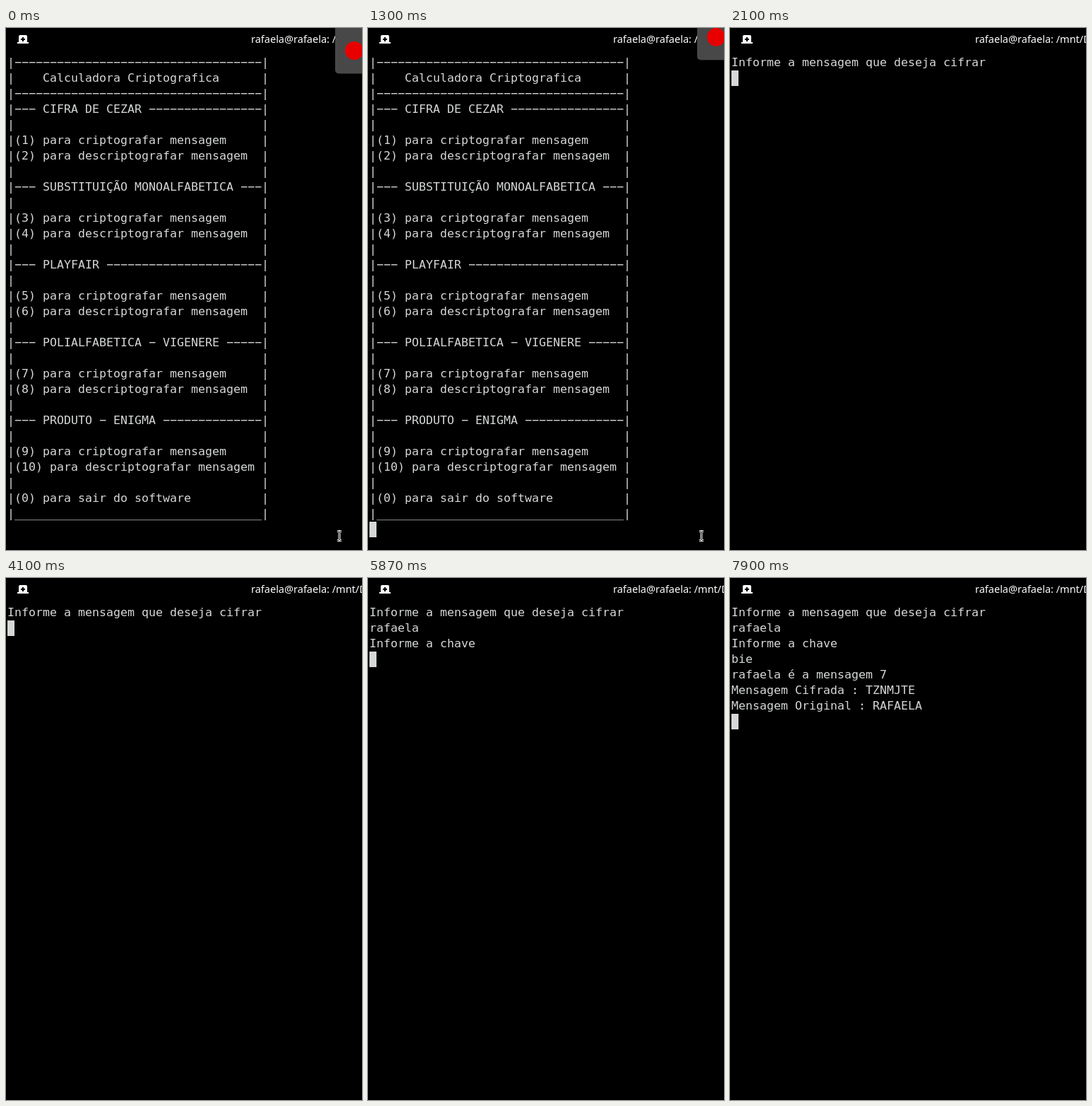
Recreate the animation shown at these times as an HTML page with a canvas. Size 504x738 px, loop 8000 ms.

```html
<!DOCTYPE html>
<html lang="pt">
<head>
<meta charset="utf-8">
<title>Calculadora Criptografica</title>
<style>
  html, body { margin: 0; width: 100%; height: 100%; overflow: hidden; background: #000; }
  canvas { display: block; }
</style>
</head>
<body>
<canvas id="stage" width="504" height="738"></canvas>
<script>
const ctx = document.getElementById('stage').getContext('2d');
const LOOP = 8000;
const CELL = { x: 2, y: 38, w: 10, h: 22, base: 16 };
const INK = '#d5d8d6';
const USER = 'rafaela';
const KEY = 'bie';

// Menu box, 35 characters between the side bars
const WIDTH = 35;
const DASH = '\u2212';
const boxed = (text, fill = ' ') => '|' + text.padEnd(WIDTH, fill) + '|';
const section = (title, first) => [
  boxed(`${DASH.repeat(3)} ${title} `, DASH),
  boxed(''),
  boxed(`(${first}) para criptografar mensagem`),
  boxed(`(${first + 1}) para descriptografar mensagem`),
  boxed('')
];
const MENU = [
  boxed('', DASH),
  boxed('    Calculadora Criptografica'),
  boxed('', DASH),
  ...section('CIFRA DE CEZAR', 1),
  ...section('SUBSTITUIÇÃO MONOALFABETICA', 3),
  ...section('PLAYFAIR', 5),
  ...section(`POLIALFABETICA ${DASH} VIGENERE`, 7),
  ...section(`PRODUTO ${DASH} ENIGMA`, 9),
  boxed('(0) para sair do software'),
  boxed('', '_')
];

// Moments (ms) at which the block cursor flips, starting hidden
const BLINKS = [100, 530, 1200, 2570, 3030, 3630, 4100, 4670, 4750, 6030, 6430, 7100, 7500];

const typed = (text, t, start, gap) =>
  t < start ? '' : text.slice(0, Math.floor((t - start) / gap) + 1);

// The last line returned is the one holding the cursor
function screenAt(t) {
  if (t < 2000) return [...MENU, typed('7', t, 1800, 80)];
  const lines = ['Informe a mensagem que deseja cifrar', typed(USER, t, 4750, 80)];
  if (t >= 5400) lines.push('Informe a chave', typed(KEY, t, 6570, 80));
  if (t >= 7500) lines.push(
    `${USER} é a mensagem ${USER.length}`,
    'Mensagem Cifrada : TZNMJTE',
    `Mensagem Original : ${USER.toUpperCase()}`,
    ''
  );
  return lines;
}

function drawTerminal(t) {
  const lines = screenAt(t);
  ctx.font = '16.6px "DejaVu Sans Mono", "Noto Sans Mono", monospace';
  ctx.fillStyle = INK;
  lines.forEach((line, row) => {
    [...line].forEach((char, col) => {
      if (char !== ' ')
        ctx.fillText(char, CELL.x + col * CELL.w, CELL.y + row * CELL.h + CELL.base);
    });
  });
  const visible = BLINKS.filter(time => time <= t).length % 2;
  if (visible) {
    const row = lines.length - 1;
    ctx.fillRect(CELL.x + lines[row].length * CELL.w, CELL.y + row * CELL.h, CELL.w, CELL.h);
  }
}

function drawTitleBar() {
  ctx.fillStyle = '#fff';
  ctx.beginPath();
  ctx.roundRect(18, 10, 12, 12, [2, 2, 0, 0]);
  ctx.rect(16, 20, 16, 2);
  ctx.fill();
  ctx.font = '14.5px "Noto Sans", "Open Sans", sans-serif';
  ctx.fillText(`${USER}@${USER}: /mnt/D`, 347, 21);
  ctx.fillStyle = '#000';
  ctx.fillRect(21, 15, 6, 2);
  ctx.fillRect(23, 13, 2, 6);
}

function drawPanel(t) {
  if (t >= 1400) return;
  let top = 0;
  if (t >= 1100) top = -1.5;
  if (t >= 1200) {
    const step = Math.floor((t - 1200) / 33.4) + 1;
    top = -1.5 - 63 * (step / 7) ** 1.5;
  }
  ctx.save();
  ctx.translate(0, top);
  ctx.fillStyle = '#484848';
  ctx.beginPath();
  ctx.roundRect(466, -10, 60, 74.5, 5);
  ctx.fill();
  ctx.fillStyle = '#e80000';
  ctx.beginPath();
  ctx.arc(493, 32, 13, 0, Math.PI * 2);
  ctx.fill();
  ctx.restore();
}

function drawPointer(t) {
  if (t >= 1770) return;
  const beam = new Path2D('M469 711.5h2l1 1 1-1h2M472 712.5v11M469 724.5h2l1-1 1 1h2');
  for (const [color, width] of [['#fff', 3], ['#000', 1]]) {
    ctx.strokeStyle = color;
    ctx.lineWidth = width;
    ctx.stroke(beam);
  }
}

function draw(now) {
  const t = now % LOOP;
  ctx.fillStyle = '#000';
  ctx.fillRect(0, 0, 504, 738);
  drawTitleBar();
  drawTerminal(t);
  drawPanel(t);
  drawPointer(t);
}

let start;
function tick(now) {
  start ??= now;
  draw(now - start);
  requestAnimationFrame(tick);
}
draw(0);
requestAnimationFrame(tick);
</script>
</body>
</html>
```
